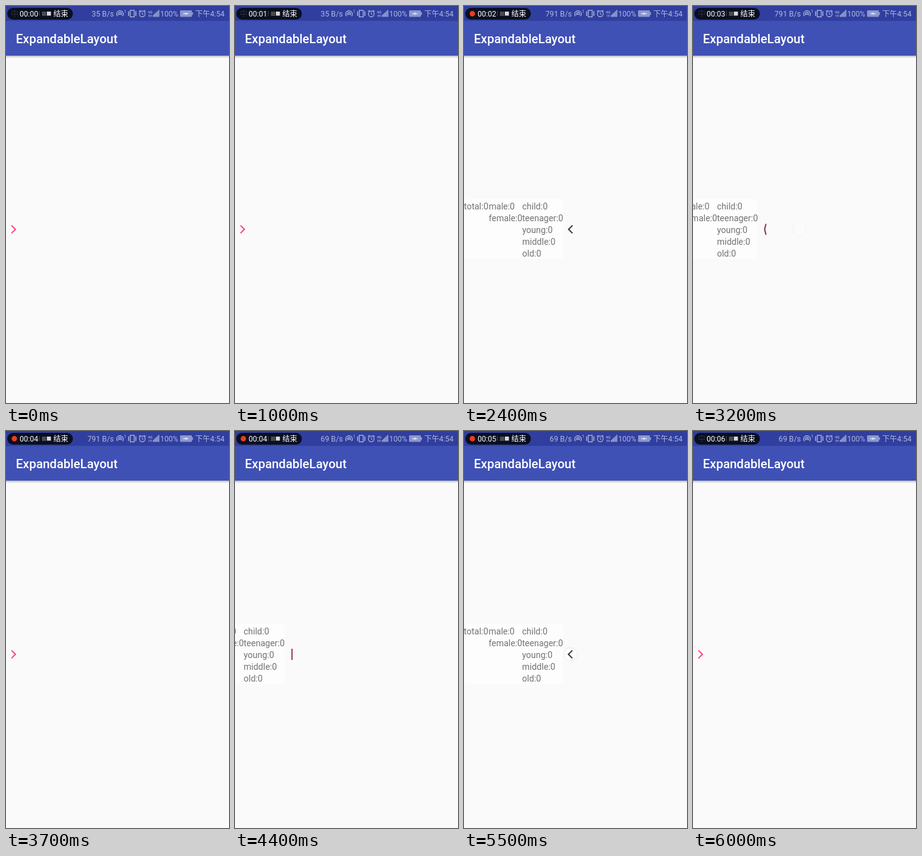
An HTML page with a canvas for the animation above (6100 ms loop, 360x640 px).

```html
<!DOCTYPE html>
<html lang="en">
<head>
<meta charset="utf-8">
<title>ExpandableLayout</title>
<style>
html, body { margin: 0; width: 100%; height: 100%; overflow: hidden; background: #fafafa; }
canvas { display: block; width: 360px; height: 640px; }
</style>
</head>
<body>
<canvas id="stage"></canvas>
<script>
const LOOP = 6100, STEP = 100;
const PANEL_WIDTH = 160, SLIDE = 400;
const SANS = 'Roboto, "Noto Sans CJK SC", "Noto Sans CJK", sans-serif';
const ICON = '#b0b7dc';

const canvas = document.getElementById('stage');
const ratio = window.devicePixelRatio || 1;
canvas.width = 360 * ratio;
canvas.height = 640 * ratio;
const ctx = canvas.getContext('2d');
ctx.scale(ratio, ratio);

// Each slide moves the panel to its open (1) or closed (0) state.
const slides = [
  { start: 1660, open: 1 },
  { start: 3040, open: 0 },
  { start: 4200, open: 1 },
  { start: 5490, open: 0 }
];
const touches = [
  { x: 13, down: 1400, up: 1600 },
  { x: 172, down: 2800, up: 3050 },
  { x: 13, down: 3950, up: 4150 },
  { x: 172, down: 5300, up: 5450 }
];
const secondMarks = [800, 1900, 2800, 3700, 4800, 5800];

const clamp = v => Math.max(0, Math.min(1, v));
const ease = u => (1 - Math.cos(Math.PI * clamp(u))) / 2;

function openness(t) {
  let value = 0;
  for (const { start, open } of slides) {
    if (t >= start) value += (open - value) * ease((t - start) / SLIDE);
  }
  return value;
}

function rect(x, y, w, h, color) {
  ctx.fillStyle = color;
  ctx.fillRect(x, y, w, h);
}

function roundRect(x, y, w, h, radii, color) {
  ctx.beginPath();
  ctx.roundRect(x, y, w, h, radii);
  ctx.fillStyle = color;
  ctx.fill();
}

function text(str, x, y, size, color, align = 'left', weight = 400) {
  ctx.font = `${weight} ${size}px ${SANS}`;
  ctx.textAlign = align;
  ctx.fillStyle = color;
  ctx.fillText(str, x, y);
}

function line(points, color, width) {
  ctx.beginPath();
  points.forEach(([x, y]) => ctx.lineTo(x, y));
  ctx.strokeStyle = color;
  ctx.lineWidth = width;
  ctx.stroke();
}

function arc(x, y, r, from = 0, to = 2 * Math.PI) {
  ctx.beginPath();
  ctx.arc(x, y, r, from, to);
}

function disc(x, y, r, color) {
  arc(x, y, r);
  ctx.fillStyle = color;
  ctx.fill();
}

function ring(x, y, r, color, width, from, to) {
  arc(x, y, r, from, to);
  ctx.strokeStyle = color;
  ctx.lineWidth = width;
  ctx.stroke();
}

function hotspotIcon() {
  for (const r of [2.8, 5.4]) ring(184, 13, r, ICON, 1.2, Math.PI * 0.78, Math.PI * 2.22);
  disc(184, 13, 1.3, ICON);
  text('1', 190.5, 11, 7, ICON);
}

function vibrateIcon() {
  ctx.strokeStyle = ICON;
  ctx.lineWidth = 1.3;
  ctx.strokeRect(200.6, 7, 6.4, 10.5);
  for (const x of [198, 209.6]) line([[x, 8.5], [x, 16]], ICON, 1.5);
}

function alarmIcon() {
  ring(220, 12.7, 4.6, ICON, 1.2);
  line([[220, 10], [220, 13], [222, 14.2]], ICON, 1);
  line([[214.7, 9], [217.5, 6.8]], ICON, 1.3);
  line([[222.5, 6.8], [225.3, 9]], ICON, 1.3);
}

function signalIcon(busy) {
  text('4G', 229, 11.5, 6, ICON, 'left', 500);
  line([[231, 14], [231, 17.5]], busy ? '#b18a78' : ICON, 1.2);
  line([[234, 14], [234, 17.5]], ICON, 1.2);
  for (let i = 0; i < 5; i++) {
    const h = 3 + i * 2;
    rect(237 + i * 2.2, 17.5 - h, 1.5, h, ICON);
  }
}

function batteryIcon() {
  roundRect(281, 7, 19, 10.5, 1, '#8c97cd');
  rect(300, 10, 1.8, 4.5, '#8c97cd');
  line([[286, 12.4], [295, 12.4]], '#dce1f5', 1.3);
  disc(290.5, 12.3, 1.8, '#dce1f5');
}

function recorderPill(t) {
  roundRect(2, 3, 106, 19, 9.5, '#0a0f20');
  const lampOff = (t + 150) % 1000 < 450;
  if (lampOff) text('中', 8, 17, 12, '#2b3042');
  else disc(13.5, 12.4, 4.3, '#f03c1c');
  const seconds = secondMarks.filter(mark => t >= mark).length;
  text('00:0' + seconds, 22, 17, 12, '#fff');
  rect(53, 8, 1.5, 8, '#343a3c');
  rect(58, 9, 7, 7, '#4a4d4c');
  rect(66, 9, 6.5, 6.5, '#d9d9d9');
  text('结束', 76.5, 17, 12, '#fff');
}

function header(t) {
  rect(0, 0, 360, 24, '#303f9f');
  rect(0, 24, 360, 56, '#3f51b5');
  const shadow = ctx.createLinearGradient(0, 80, 0, 84);
  shadow.addColorStop(0, 'rgba(60,60,70,.34)');
  shadow.addColorStop(1, 'rgba(60,60,70,0)');
  rect(0, 80, 360, 4, shadow);
  text('ExpandableLayout', 16, 59.5, 20, '#fff', 'left', 500);

  const busy = t >= 1100 && t < 4200;
  const speed = t < 1100 ? 35 : busy ? 791 : 69;
  text(speed + ' B/s', 174, 17, 12.2, ICON, 'right');
  hotspotIcon();
  vibrateIcon();
  alarmIcon();
  signalIcon(busy);
  batteryIcon();
  text('100%', 249, 17, 12, ICON);
  text('下午4:54', 305.5, 17, 12, ICON);
  recorderPill(t);
}

function panel(shift) {
  roundRect(shift, 311, PANEL_WIDTH, 97, 5, '#fdfdfe');
  const columns = [
    [0, ['total']],
    [40, ['male', 'female']],
    [94, ['child', 'teenager', 'young', 'middle', 'old']]
  ];
  for (const [x, labels] of columns) {
    labels.forEach((label, row) => text(label + ':0', x + shift, 328 + row * 19, 14, '#737373'));
  }
}

function arrow(open) {
  const from = [255, 64, 129], to = [51, 51, 60];
  const color = `rgb(${from.map((c, i) => Math.round(c + (to[i] - c) * open))})`;
  const angle = Math.PI / 4 * (1 - 2 * open);
  const dx = 9 * Math.sin(angle), dy = 9 * Math.cos(angle);
  const x = 12 + PANEL_WIDTH * open;
  line([[x - dx / 2, 360 - dy], [x + dx / 2, 360], [x - dx / 2, 360 + dy]], color, 2);
}

function touchDots(t) {
  for (const { x, down, up } of touches) {
    if (t < down || t > up + 250) continue;
    const alpha = t < up ? 1 : 1 - (t - up) / 250;
    disc(x, 360, 11, `rgba(255,255,255,${0.6 * alpha})`);
    ring(x, 360, 11, `rgba(150,150,150,${0.2 * alpha})`, 1);
  }
}

function draw(t) {
  const open = openness(t);
  rect(0, 0, 360, 640, '#fafafa');
  header(t);
  if (open > 0) panel(PANEL_WIDTH * (open - 1));
  touchDots(t);
  arrow(open);
}

const begin = performance.now();
function tick() {
  const elapsed = (performance.now() - begin) % LOOP;
  draw(Math.floor(elapsed / STEP) * STEP);
  requestAnimationFrame(tick);
}
tick();
</script>
</body>
</html>
```
